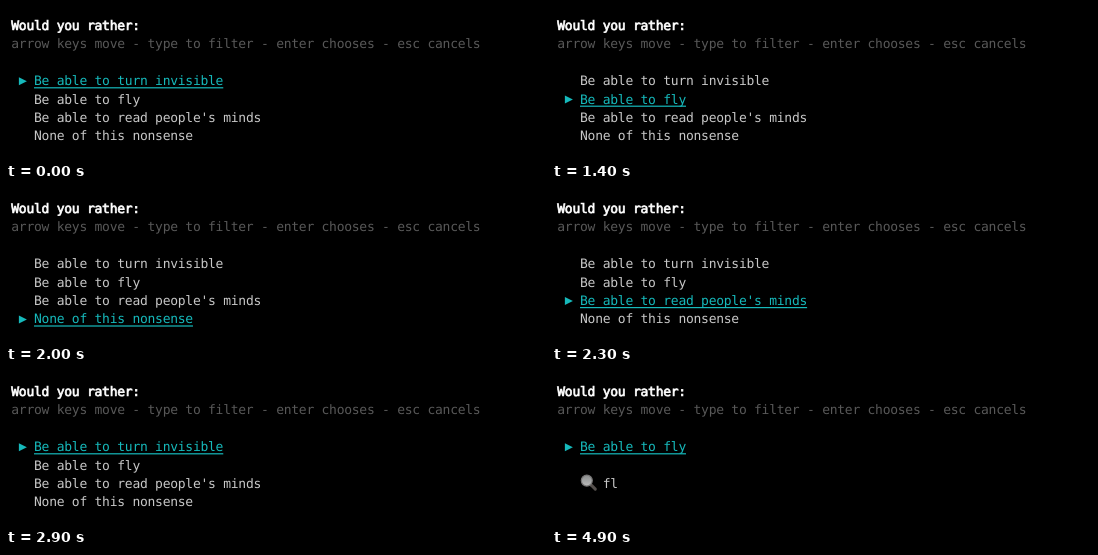
Recreate the animation shown at these times as an HTML page with a canvas. Size 540 by 155 pixels, loop 5000 ms.

```html
<!DOCTYPE html>
<html lang="en">
<head>
<meta charset="utf-8">
<style>
  html, body { margin: 0; width: 100%; height: 100%; overflow: hidden; background: #000; }
  canvas { display: block; }
</style>
</head>
<body>
<canvas id="stage" width="540" height="155"></canvas>
<script>
const ctx = document.getElementById("stage").getContext("2d");
const LOOP = 5000;
const CELL = 7.57, LEFT = 5.3, FIRST_BASELINE = 24, LINE = 18.4;
const CYAN = "#16b9bb", TEXT = "#c7c7c7", DIM = "#585858";

ctx.font = '13px "DejaVu Sans Mono", monospace';
ctx.textRendering = "geometricPrecision";
ctx.letterSpacing = "-0.26px";

const choices = [
  "Be able to turn invisible",
  "Be able to fly",
  "Be able to read people's minds",
  "None of this nonsense"
];

const steps = [
  { at: 0, selected: 0 },
  { at: 1400, selected: 1 },
  { at: 1700, selected: 2 },
  { at: 1900, selected: 3 },
  { at: 2300, selected: 2 },
  { at: 2600, selected: 1 },
  { at: 2900, selected: 0 },
  { at: 4500, selected: 0, query: "f" },
  { at: 4900, selected: 0, query: "fl" }
];

const columnX = column => LEFT + column * CELL;
const baseline = row => FIRST_BASELINE + row * LINE;

function write(text, column, row, color) {
  ctx.fillStyle = color;
  ctx.fillText(text, columnX(column), baseline(row));
}

// The terminal emboldens by thickening the regular letters.
function writeBold(text, column, row, color) {
  write(text, column, row, color);
  ctx.strokeStyle = color;
  ctx.lineWidth = 0.7;
  ctx.strokeText(text, columnX(column), baseline(row));
}

function drawChoice(text, row, active) {
  write(text, 3, row, active ? CYAN : TEXT);
  if (!active) return;
  const x = columnX(1), y = baseline(row) - 4;
  ctx.fillRect(columnX(3), baseline(row) + 2, text.length * CELL, 1.2);
  ctx.beginPath();
  ctx.moveTo(x, y - 4);
  ctx.lineTo(x + 8, y);
  ctx.lineTo(x, y + 4);
  ctx.fill();
}

function drawMagnifier(row) {
  const x = columnX(3) + 6.8, y = baseline(row) - 7.4;
  ctx.lineCap = "round";
  ctx.strokeStyle = "#55504d";
  ctx.lineWidth = 3;
  ctx.beginPath();
  ctx.moveTo(x + 4.5, y + 4.5);
  ctx.lineTo(x + 8.5, y + 8.5);
  ctx.stroke();

  const glass = ctx.createLinearGradient(x, y - 5, x, y + 5);
  glass.addColorStop(0, "#8d8f8f");
  glass.addColorStop(1, "#b9baba");
  ctx.fillStyle = glass;
  ctx.strokeStyle = "#777676";
  ctx.lineWidth = 1.2;
  ctx.beginPath();
  ctx.arc(x, y, 5.5, 0, Math.PI * 2);
  ctx.fill();
  ctx.stroke();
}

function draw(time) {
  const { selected, query = "" } = steps.findLast(step => step.at <= time);
  const visible = choices.filter(choice => choice.includes(query));

  ctx.fillStyle = "#000";
  ctx.fillRect(0, 0, 540, 155);
  writeBold("Would you rather:", 0, 0, "#fff");
  write("arrow keys move - type to filter - enter chooses - esc cancels", 0, 1, DIM);
  visible.forEach((choice, i) => drawChoice(choice, 3 + i, i === selected));

  if (query) {
    const row = 4 + visible.length;
    drawMagnifier(row);
    write(query, 6, row, TEXT);
  }
}

const start = performance.now();
function tick() {
  draw((performance.now() - start) % LOOP);
  requestAnimationFrame(tick);
}
tick();
</script>
</body>
</html>
```
